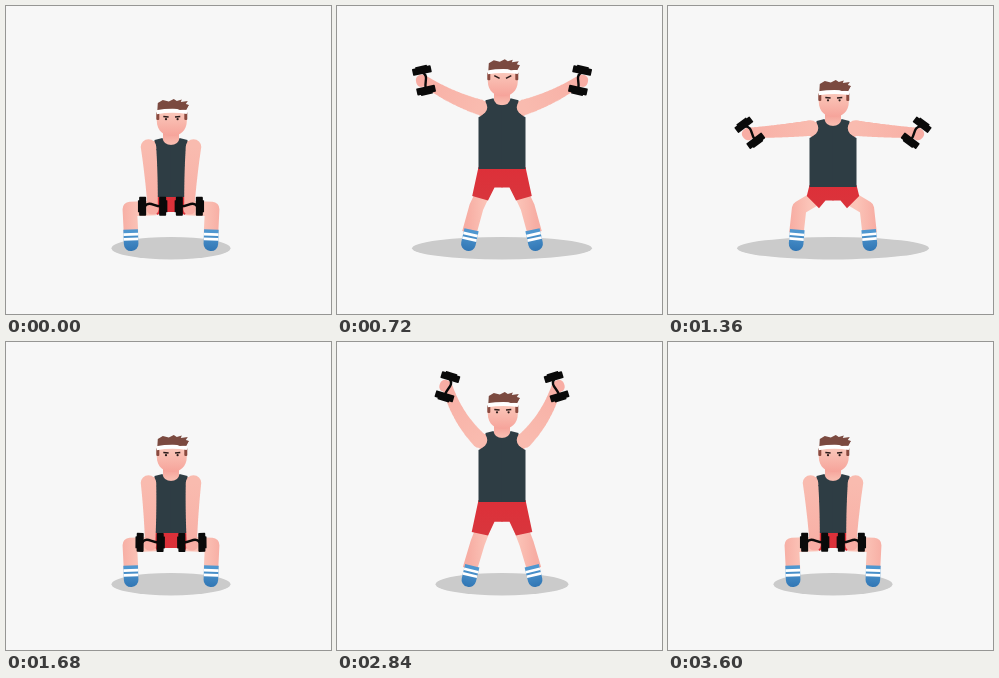
Write an HTML page with a canvas that moves like this. It is 325 by 308 pixels and loops after 4.8 s.

```html
<!DOCTYPE html>
<html lang="en">
<head>
<meta charset="utf-8">
<title>Dumbbell workout</title>
<style>
html, body { margin: 0; width: 100%; height: 100%; overflow: hidden; background: #f7f7f7; }
canvas { display: block; }
</style>
</head>
<body>
<canvas id="stage"></canvas>
<script>
const W = 325, H = 308, LOOP = 4800, REP = 1800, STEP = 40, MID = 165;
const INK = '#0a0a0a', HAIR = '#7b4a40';
const canvas = document.getElementById('stage');
const ctx = canvas.getContext('2d');
const dpr = window.devicePixelRatio || 1;
canvas.width = W * dpr;
canvas.height = H * dpr;
canvas.style.width = W + 'px';
canvas.style.height = H + 'px';

const rad = deg => deg * Math.PI / 180;
const lerp = (a, b, u) => a + (b - a) * u;

function ease(t, from, to) {
  const u = Math.min(1, Math.max(0, (t - from) / (to - from)));
  return u * u * (3 - 2 * u);
}

// The arms start before the legs push and come down after them.
function poseAt(t) {
  const rise = ease(t, 250, 830) - ease(t, 973, 1680);
  const swing = ease(t, 0, 1030) - ease(t, 1067, 1729);
  return {
    rise,
    top: lerp(93, 49, rise),
    hem: lerp(191, 159, Math.pow(rise, 1.38)),
    arm: rad(lerp(-94, 59, swing)),
    grip: rad(lerp(-90, 17, Math.pow(swing, 1.3))),
    strain: t > 460 && t < 900
  };
}

function gradient(x0, y0, x1, y1, from, to) {
  const g = ctx.createLinearGradient(x0, y0, x1, y1);
  g.addColorStop(0, from);
  g.addColorStop(1, to);
  return g;
}

function poly(points, color) {
  ctx.fillStyle = color;
  ctx.beginPath();
  points.forEach(p => ctx.lineTo(p[0], p[1]));
  ctx.fill();
}

function oval(x, y, rx, ry, color) {
  ctx.fillStyle = color;
  ctx.beginPath();
  ctx.ellipse(x, y, rx, ry, 0, 0, Math.PI * 2);
  ctx.fill();
}

function box(x, y, w, h, r, color) {
  ctx.fillStyle = color;
  ctx.beginPath();
  ctx.roundRect(x, y, w, h, r);
  ctx.fill();
}

function line(x0, y0, x1, y1, width, color) {
  ctx.strokeStyle = color;
  ctx.lineWidth = width;
  ctx.beginPath();
  ctx.moveTo(x0, y0);
  ctx.lineTo(x1, y1);
  ctx.stroke();
}

function bothSides(draw) {
  draw();
  ctx.save();
  ctx.translate(MID * 2, 0);
  ctx.scale(-1, 1);
  draw();
  ctx.restore();
}

function leg({ rise }) {
  const knee = lerp(123.8, 141, rise), ankle = lerp(125, 133, rise);
  ctx.lineWidth = 14.5;
  ctx.lineJoin = 'round';
  ctx.strokeStyle = gradient(knee - 9, 0, knee + 10, 0, '#f7ada3', '#fbc4b8');
  ctx.beginPath();
  ctx.moveTo(150, lerp(202, 176, rise));
  ctx.lineTo(knee, lerp(203, 201, rise));
  ctx.lineTo(ankle, 227);
  ctx.stroke();

  ctx.save();
  ctx.translate(ankle, 234);
  ctx.rotate(Math.atan2(knee - ankle, 32));
  box(-7.3, -10.5, 14.6, 21.5, [0, 0, 7, 7], gradient(0, -8, 0, 11, '#4f97d0', '#3176b4'));
  for (const y of [-7, -2.3]) box(-7.3, y, 14.6, 2.7, 0, '#fff');
  ctx.restore();
}

function shortsHalf({ rise, hem }) {
  const crotch = lerp(206, 179, rise);
  poly([
    [MID + 0.5, hem - 2],
    [141.5, hem - 2],
    [lerp(142, 134.5, rise), 190],
    [151, lerp(209, 193, rise)],
    [157.5, crotch],
    [MID + 0.5, crotch]
  ], gradient(0, hem, 0, hem + 34, '#dd3039', '#d8363d'));
}

function tankHalf({ top, hem }) {
  ctx.fillStyle = '#2e3d44';
  ctx.beginPath();
  ctx.moveTo(MID + 0.5, hem);
  ctx.lineTo(141.5, hem);
  ctx.lineTo(141.5, top + 58);
  ctx.quadraticCurveTo(150, top + 55, 148.5, top + 41);
  ctx.lineTo(156.5, top + 39);
  ctx.quadraticCurveTo(157.5, top + 46, MID + 0.5, top + 46);
  ctx.fill();
}

function torso(pose) {
  const y = pose.top;
  bothSides(() => box(142, y + 42, 12, 16, 4, '#f8b3a8'));
  box(157, y + 32, 16, 16, 0, gradient(0, y + 34, 0, y + 44, '#f5a097', '#f9bbaf'));
  bothSides(() => tankHalf(pose));
}

function dumbbell() {
  ctx.strokeStyle = INK;
  ctx.lineWidth = 2.4;
  ctx.beginPath();
  ctx.moveTo(0, -8);
  ctx.bezierCurveTo(6, -3, 0, 1, 0, 8);
  ctx.stroke();
  for (const side of [-1, 1]) {
    box(-9.5, side * 10 - 3.5, 19, 7, 0.8, INK);
    box(-6, side * 13.2 - 1.5, 12, 3, 0.5, INK);
  }
}

function arm(pose) {
  const c = Math.cos(pose.arm), s = Math.sin(pose.arm);
  const sx = 142.5, sy = pose.top + 48, reach = 61 + 1.5 * s;
  const hx = sx - reach * c, hy = sy - reach * s;
  const bend = 1 + 8 * Math.max(0, s);
  const ex = (sx + hx) / 2 - s * bend, ey = (sy + hy) / 2 + c * bend;
  ctx.fillStyle = gradient(sx, sy, hx, hy, '#f9bbaf', '#f8b0a6');
  ctx.beginPath();
  for (let i = 0; i <= 40; i++) {
    const u = i / 40, r = lerp(7.8, 5.2, u);
    const x = lerp(lerp(sx, ex, u), lerp(ex, hx, u), u);
    const y = lerp(lerp(sy, ey, u), lerp(ey, hy, u), u);
    ctx.moveTo(x + r, y);
    ctx.arc(x, y, r, 0, Math.PI * 2);
  }
  ctx.fill();

  ctx.save();
  ctx.translate(hx, hy);
  ctx.rotate(pose.grip);
  box(-8, -6, 12, 12, 5, '#f8ada4');
  dumbbell();
  ctx.restore();
}

function head({ top, strain }) {
  ctx.save();
  ctx.translate(165.8, top);
  ctx.fillStyle = gradient(0, 14, 0, 37, '#fac6b9', '#f6a39a');
  ctx.beginPath();
  ctx.moveTo(-15, 11);
  ctx.lineTo(15, 11);
  ctx.lineTo(15, 22);
  ctx.bezierCurveTo(15, 42, -15, 42, -15, 22);
  ctx.fill();

  poly([[-14.5, 12], [-14, 4], [-9, 1], [-3, 2.5], [2, 0], [5, 2], [10, 0.5], [9, 3],
    [16, 2], [14, 5], [17, 6], [14, 12]], HAIR);
  for (const side of [-1, 1]) {
    box(side * 14 - 1.5, 13, 3, 8, 1, '#8a4a3f');
    line(side * 8.5, strain ? 16.5 : 17.5, side * 3.2, strain ? 19.3 : 18, 1.5, '#2a1b1a');
    if (!strain) oval(side * 5.8, 20.2, 1.1, 1.1, '#2a1b1a');
  }
  ctx.strokeStyle = '#fff';
  ctx.lineWidth = 4;
  ctx.beginPath();
  ctx.moveTo(-15.3, 13.2);
  ctx.quadraticCurveTo(0, 10.5, 15.3, 13);
  ctx.stroke();
  poly([[3, 9], [8, 5], [17, 6], [14, 10.5], [8, 11]], HAIR);
  ctx.restore();
}

function draw(time) {
  const t = time >= REP * 2 ? 0 : Math.floor(time / STEP) * STEP % REP;
  const pose = poseAt(t);
  ctx.setTransform(dpr, 0, 0, dpr, 0, 0);
  ctx.fillStyle = '#f7f7f7';
  ctx.fillRect(0, 0, W, H);
  oval(MID, 242.2, Math.max(59.5, 35 + 61 * Math.cos(pose.arm)), 11.2, '#cbcbcb');
  bothSides(() => leg(pose));
  bothSides(() => shortsHalf(pose));
  torso(pose);
  bothSides(() => arm(pose));
  head(pose);
}

function tick() {
  draw(performance.now() % LOOP);
  requestAnimationFrame(tick);
}
tick();
</script>
</body>
</html>
```
